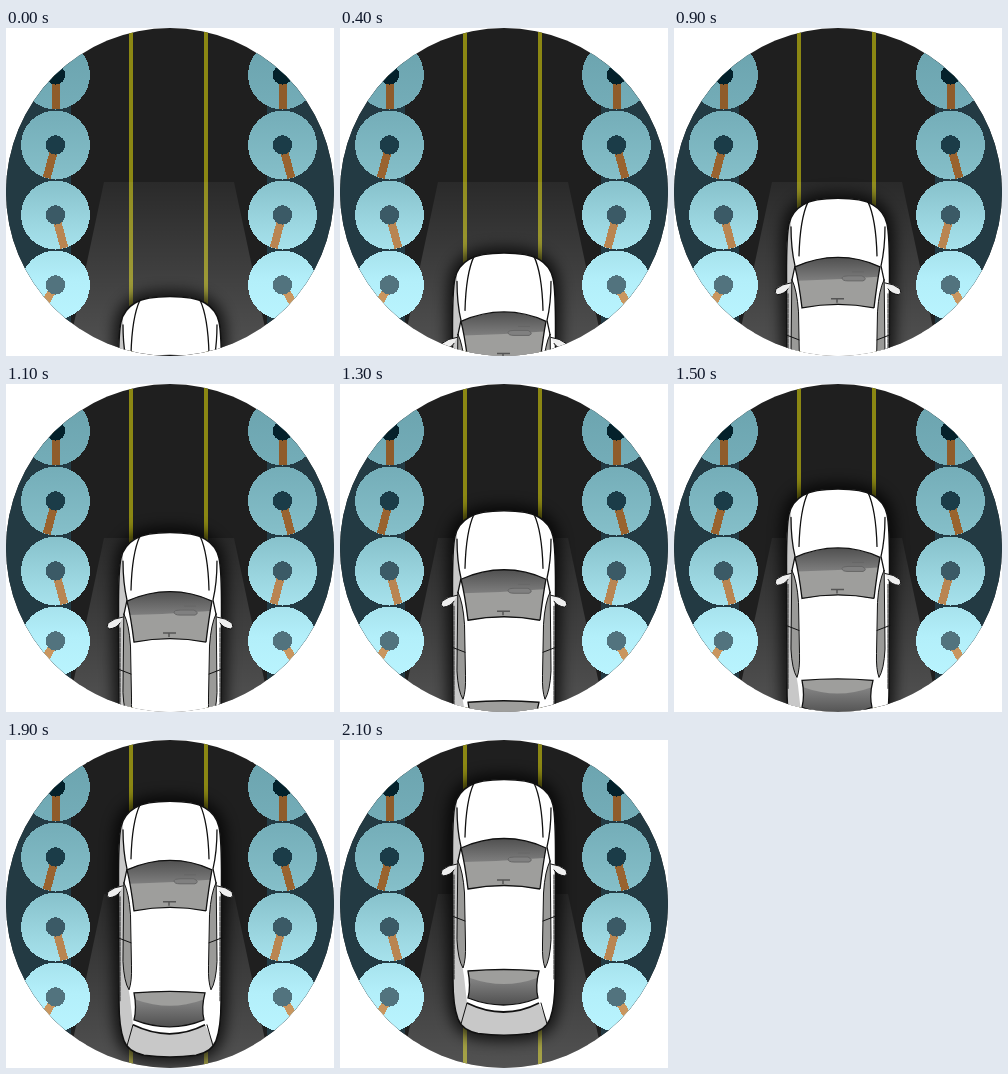
Write an HTML page that moves like this. It is 328 by 328 pixels and loops after 4100 ms.

```html
<!DOCTYPE html>
<html lang="en">
<head>
<meta charset="utf-8">
<title>Car on a road</title>
<style>
html, body { margin: 0; width: 100%; height: 100%; overflow: hidden; background: #fff; }
svg { display: block; width: 100vw; height: 100vh; }
</style>
</head>
<body>
<svg viewBox="0 0 328 328">
  <defs>
    <clipPath id="disc"><circle cx="164" cy="164" r="164"/></clipPath>
    <linearGradient id="beam" gradientUnits="userSpaceOnUse" x1="0" y1="154" x2="0" y2="328">
      <stop offset="0" stop-color="#fff" stop-opacity=".05"/>
      <stop offset="1" stop-color="#fff" stop-opacity=".23"/>
    </linearGradient>
    <linearGradient id="leaf" gradientUnits="userSpaceOnUse" x1="0" y1="12" x2="0" y2="292">
      <stop offset="0" stop-color="#6ba3ae"/>
      <stop offset=".25" stop-color="#74adb8"/>
      <stop offset=".48" stop-color="#84bec8"/>
      <stop offset=".66" stop-color="#9cd7e1"/>
      <stop offset=".86" stop-color="#b3effa"/>
      <stop offset="1" stop-color="#b9f4fe"/>
    </linearGradient>
    <linearGradient id="glass" x1="0" y1="0" x2="0" y2="1">
      <stop offset="0" stop-color="#505050"/>
      <stop offset=".5" stop-color="#828282"/>
    </linearGradient>
    <linearGradient id="rear" x1="0" y1="0" x2="0" y2="1">
      <stop offset=".3" stop-color="#808080"/>
      <stop offset="1" stop-color="#505050"/>
    </linearGradient>
    <filter id="blur" x="-30%" y="-15%" width="160%" height="130%">
      <feGaussianBlur stdDeviation="7"/>
    </filter>
    <path id="body" d="M112.500 128C112.500 104 112 78 115 65C117 56 122 50 129 46C139 40 152 39.500 164 39.500S189 40 199 46C206 50 211 56 213 65C216 78 215.500 104 215.500 128L215 240Q215 266 210 279Q206 290 190 293.500Q164 297 138 293.500Q122 290 118 279Q113 266 113 240Z"/>
    <clipPath id="shell"><use href="#body"/></clipPath>
    <g id="side" fill="none" stroke="#111" stroke-linecap="round">
      <path d="M117 124Q108 125 102 130Q100 134 103 136Q111 135 114 130" fill="#eee"/>
      <path d="M118 121Q123 131 124.500 153L125.500 204Q126 220 123 228Q118 220 117 200Z" fill="#9a9a98"/>
      <path d="M112 176L125 181"/>
      <path d="M117 68Q117 90 121 107L118 121" stroke-width="1.300"/>
      <path d="M134 43Q126 60 125 97" stroke-width="1.300"/>
      <path d="M114 135V240" stroke="#222" stroke-dasharray="4 1"/>
      <path d="M127 263L121 284"/>
    </g>
  </defs>

  <g clip-path="url(#disc)">
    <rect width="328" height="328" fill="#1f1f1f"/>
    <path d="M0 0H65V328H0ZM261 0H328V328H261Z" fill="#233a43"/>
    <path d="M123 0h4v328h-4ZM198 0h4v328h-4Z" fill="#8b8713"/>
    <path d="M98 154H228L265 328H61Z" fill="url(#beam)"/>
    <g id="trees" shape-rendering="crispEdges"></g>
    <g id="car">
      <use href="#body" stroke="#000" stroke-width="12" opacity=".72" filter="url(#blur)"/>
      <use href="#body" fill="#fff"/>
      <g clip-path="url(#shell)" fill="#c8c8c8">
        <path d="M110 58H117Q117 90 121 107L118 121V200L124 236L127 263Q164 281 199 263L209 284V300H110Z"/>
      </g>
      <use href="#body" fill="none" stroke="#111" stroke-width="1.500"/>
      <use href="#side"/>
      <use href="#side" transform="matrix(-1 0 0 1 328 0)"/>
      <path d="M128 149Q164 141 200 149Q201 166 202 190Q202 214 198 230Q164 227 129 230Q126 214 126 190Q126 166 128 149Z" fill="#fff"/>
      <path d="M121 108Q142 98.500 164 98.500T206 108Q203 124 200 149Q164 142 128 149Q125 124 121 108Z" fill="url(#glass)"/>
      <path d="M124 122Q164 121 204 118Q202 132 200 149Q164 142 128 149Z" fill="#9e9e9c"/>
      <path d="M128 231Q164 228 199 231Q195 246 198 258Q164 272 128 258Q131 246 128 231Z" fill="url(#rear)"/>
      <path d="M128 231Q164 228 199 231L197 238Q164 250 130 238Z" fill="#9e9e9c"/>
      <g fill="none" stroke="#111" stroke-width="1.300">
        <path d="M200 149Q203 124 206 108Q186 98.500 164 98.500T121 108Q125 124 128 149Q164 142 200 149"/>
        <path d="M128 231Q164 228 199 231Q195 246 198 258Q164 272 128 258Q131 246 128 231Z"/>
        <path d="M127 263Q164 281 199 263" stroke-width="1.800"/>
      </g>
      <path d="M168 119Q168 117 174 117H188Q194 120 189 122H174Q168 122 168 119ZM178 113H190" fill="#808080" stroke="#666"/>
      <path d="M157 140H170M163 140V144" fill="none" stroke="#555" stroke-width="1.500"/>
    </g>
  </g>
</svg>
<script>
const STEP = 100, STEPS = 21, LOOP = 4100, TRAVEL = 229;
const car = document.getElementById('car');

// Height, trunk lean in degrees, trunk colour, core colour
const rows = [
  [47, 0, '#8f5c2b', '#04212b'],
  [117, 15, '#99632f', '#1b3c48'],
  [187, -15, '#b98551', '#3b5a66'],
  [257, 30, '#c9965f', '#52737e']
];

function tree(x, side, [y, lean, bark, core]) {
  return `<circle cx="${x}" cy="${y}" r="34.500" fill="url(#leaf)"/>
    <rect x="${x - 4}" y="${y}" width="8" height="34" fill="${bark}" transform="rotate(${side * lean} ${x} ${y})"/>
    <circle cx="${x}" cy="${y}" r="9.700" fill="${core}"/>`;
}

document.getElementById('trees').innerHTML =
  rows.map(r => tree(49.5, 1, r) + tree(276.5, -1, r)).join('');

function draw(ms) {
  const step = Math.min(STEPS, Math.floor(ms % LOOP / STEP));
  const y = TRAVEL * (1 - step / STEPS);
  car.setAttribute('transform', `translate(0 ${y.toFixed(2)})`);
}

let start;
function tick(now) {
  start ??= now;
  draw(now - start);
  requestAnimationFrame(tick);
}
draw(0);
requestAnimationFrame(tick);
</script>
</body>
</html>
```
